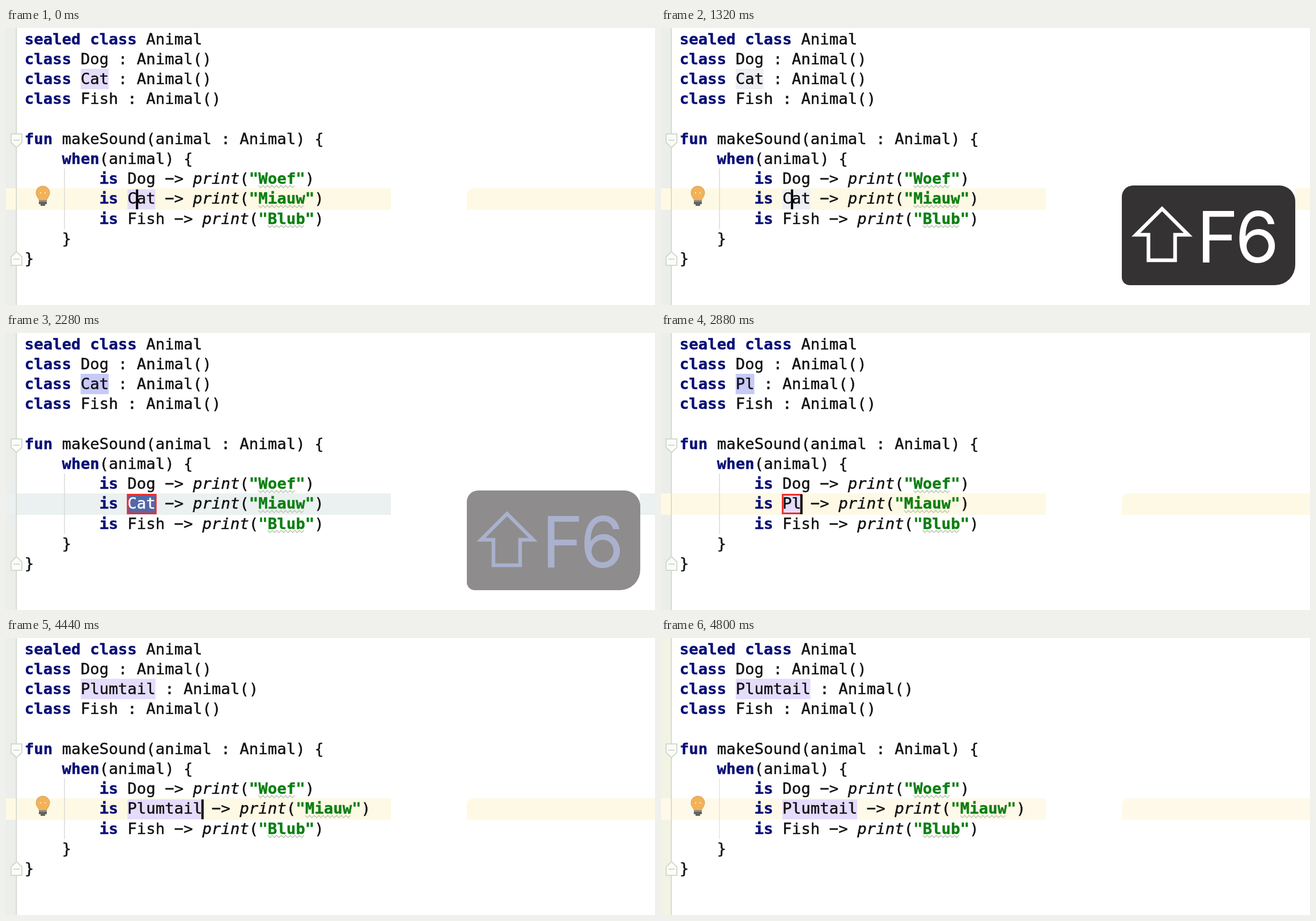
An HTML page with a canvas that plays this animation: 1145x489 px, repeating every 4920 ms.

```html
<!DOCTYPE html>
<html lang="en">
<head>
<meta charset="utf-8">
<title>Rename refactoring</title>
<style>
  html, body { margin: 0; height: 100%; overflow: hidden; background: #fff; }
  canvas { display: block; }
</style>
</head>
<body>
<canvas id="stage" width="1145" height="489"></canvas>
<script>
const ctx = document.getElementById('stage').getContext('2d');
const LOOP = 4920, STEP = 120;
const LEFT = 32.7, CHAR = 16.5, BASE = 28.8, ROW = 35.2;
const KEY_IN = 1320, RENAME = 1920, FADE = 2040, TYPE = 2640, ACCEPT = 3960;
const NEW_NAME = 'Plumtail';
const TOKENS = /\b(?:sealed|class|fun|when|is)\b|print|"\w+"|\w+|\S/g;
const KEYWORD = /^(sealed|class|fun|when|is)$/;

const clamp = v => Math.max(0, Math.min(1, v));
const colX = col => LEFT + col * CHAR;

function rect(x, y, w, h, color) {
  ctx.fillStyle = color;
  ctx.fillRect(x, y, w, h);
}

function path(points, closed) {
  ctx.beginPath();
  points.forEach(([x, y]) => ctx.lineTo(x, y));
  if (closed) ctx.closePath();
}

function stroke(color, width) {
  ctx.strokeStyle = color;
  ctx.lineWidth = width;
  ctx.stroke();
}

function wave(x, y, width) {
  const points = [];
  for (let i = 0; i <= width; i += 4) points.push([x + i, y + (i % 8 ? 2 : -2)]);
  path(points);
  stroke('#c3cabb', 1.6);
}

function drawLine(text, row, selected) {
  const y = BASE + row * ROW;
  for (const { 0: token, index } of text.matchAll(TOKENS)) {
    const keyword = KEYWORD.test(token), string = token[0] === '"';
    const style = keyword || string ? 'bold ' : token === 'print' ? 'italic ' : '';
    const color = keyword ? '#080f76' : string ? '#0b7f12' :
      selected && index === 11 ? '#fff' : '#111';
    if (string) wave(colX(index + 1), y + 4.8, (token.length - 2) * CHAR);
    ctx.font = style + '27.4px "DejaVu Sans Mono", monospace';
    ctx.fillStyle = ctx.strokeStyle = color;
    ctx.lineWidth = 0.45;
    ctx.fillText(token, colX(index), y);
    ctx.strokeText(token, colX(index), y);
  }
}

// Fold marker: a small shield pointing down (dir 1) or up (dir -1)
function foldMark(y, dir) {
  path([[9, y], [28, y], [28, y + 15 * dir], [18.5, y + 24 * dir], [9, y + 15 * dir]], true);
  ctx.fillStyle = '#fbfdf8';
  ctx.fill();
  stroke('#d3dacf', 2);
  rect(13, y + 11 * dir - 1, 11, 2, '#d3dacf');
}

function bulb() {
  ctx.beginPath();
  ctx.arc(65, 291, 11.8, 2.6, 0.54);
  ctx.lineTo(71, 304);
  ctx.lineTo(59, 304);
  ctx.closePath();
  ctx.fillStyle = '#f3b257';
  ctx.fill();
  stroke('#d9a661', 1.2);
  rect(60, 290, 2, 2, '#fff0c8');
  rect(68, 290, 2, 2, '#fff0c8');
  rect(58, 304, 14, 3, '#8b8b88');
  rect(58, 307, 14, 4, '#62625f');
  rect(61, 311, 8, 3, '#62625f');
}

function keyCap(fade) {
  ctx.globalAlpha = 1 - fade;
  ctx.fillStyle = '#343233';
  ctx.beginPath();
  ctx.roundRect(813, 278, 306, 176, [20, 28, 36, 14]);
  ctx.fill();
  ctx.globalAlpha = 1;

  const tint = 4 * fade * (1 - fade);
  const ink = `rgb(${255 - 87 * tint}, ${255 - 79 * tint}, ${255 - 52 * tint})`;
  path([[884, 319], [838, 365], [860, 365], [860, 410], [907, 410], [907, 365], [930, 365]], true);
  stroke(ink, 6.5);
  ctx.font = '125px Inter, sans-serif';
  ctx.fillStyle = ink;
  for (const [glyph, x] of [['F', 955], ['6', 1020]])
    ctx.fillText(glyph, x + ctx.measureText(glyph).actualBoundingBoxLeft, 414);
}

function draw(t) {
  const typed = Math.max(0, Math.min(NEW_NAME.length, (t - TYPE) / STEP));
  const name = typed ? NEW_NAME.slice(0, typed) : 'Cat';
  const width = name.length * CHAR;
  const renaming = t >= RENAME && t < ACCEPT;
  const selected = renaming && !typed;
  const fade = clamp((t - FADE) / 540);
  const keyShown = t >= KEY_IN && fade < 1;
  const last = t >= 4800;

  rect(0, 0, 1145, 489, '#fff');
  rect(0, 0, 18, 489, last ? '#f3f3e4' : '#ebeeea');

  // Current line, with the blank strip left of the key cap
  const lineColor = t >= RENAME && t < 2520 ? '#ebf0f0' : last ? '#fff9e9' : '#fef9e4';
  rect(0, 283, 679, 38, lineColor);
  ctx.beginPath();
  if (keyShown) ctx.rect(1118, 283, 27, 38);
  else ctx.roundRect(813, 283, 332, 38, [12, 0, 0, 0]);
  ctx.fill();
  rect(17.5, 0, 1.5, 489, '#cdd3ca');

  const usage = t >= KEY_IN && t < RENAME ? '#eeeff4' : '#e5dcfb';
  rect(colX(6), 72, width, 36, renaming ? '#c7c9f7' : usage);
  rect(colX(11), 285, width, 35, selected ? '#5468a8' : usage);

  rect(102.5, 248, 1.5, 107, last ? '#e6e6d4' : '#d9dbd8');
  foldMark(187, 1);
  foldMark(419, -1);

  [
    'sealed class Animal',
    'class Dog : Animal()',
    `class ${name} : Animal()`,
    'class Fish : Animal()',
    '',
    'fun makeSound(animal : Animal) {',
    '    when(animal) {',
    '        is Dog −> print("Woef")',
    `        is ${name} −> print("Miauw")`,
    '        is Fish −> print("Blub")',
    '    }',
    '}'
  ].forEach((text, row) => drawLine(text, row, selected && row === 8));

  if (renaming) {
    ctx.strokeStyle = t < 3720 ? '#ef2b2b' : '#8a6b74';
    ctx.lineWidth = 3;
    ctx.strokeRect(colX(11) + 0.5, 285.5, width, 33);
  }
  if (t < RENAME || t >= 4200) bulb();

  const caretOn = t < RENAME ? t % 960 < 480 : !selected && t < 4560;
  if (caretOn) rect(colX(typed ? 11 + typed : 12) - 1.5, 285, 4, 35, '#000');
  if (keyShown) keyCap(fade);
}

function frame() {
  const t = performance.now() % LOOP;
  draw(Math.floor(t / STEP) * STEP);
  requestAnimationFrame(frame);
}
frame();
</script>
</body>
</html>
```
